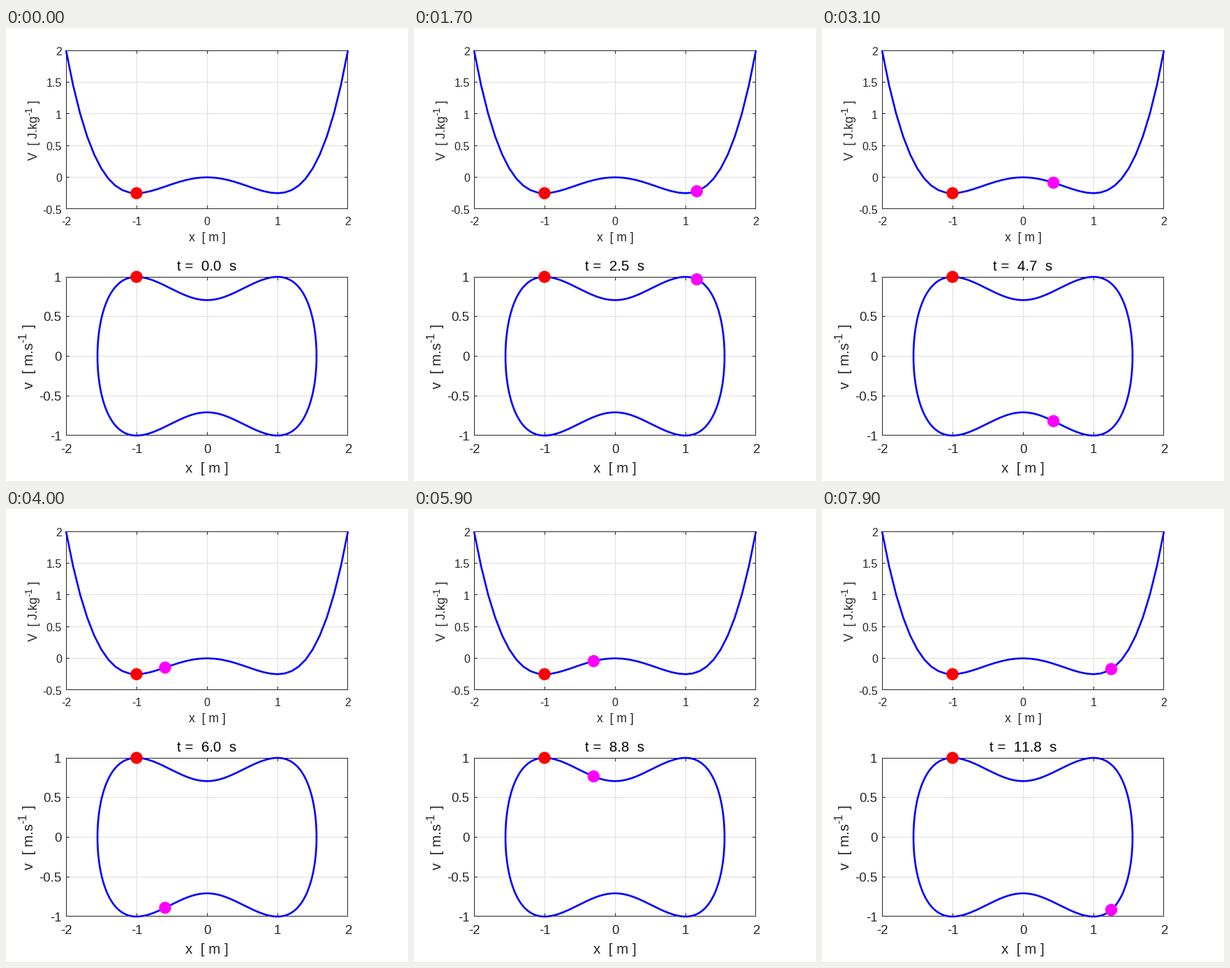
A matplotlib script for the animation above (8 s loop, 576x648 px).

```python
import math

import numpy as np
import matplotlib.pyplot as plt
from matplotlib.animation import FuncAnimation
from matplotlib.patches import Circle

W, H = 576, 648
FRAMES, INTERVAL, DT = 80, 100, 0.15
INK, GRID = "#262626", "#dedede"
LEFT, RIGHT = 86, 490
RADIUS = 8.67

plt.rcParams["font.family"] = "Liberation Sans"
plt.rcParams["text.kerning_factor"] = 6  # practically no kerning

# Advance widths in em, for aligning text by its pen positions
EM = {**dict.fromkeys(" .[]t", 0.278), **dict.fromkeys("xvskJ", 0.5),
      "-": 0.333, "=": 0.584, "m": 0.833, "V": 0.667}

# One unit is one pixel, with y pointing down
fig = plt.figure(figsize=(W / 72, H / 72), dpi=72, facecolor="white")
ax = fig.add_axes([0, 0, 1, 1])
ax.set(xlim=(0, W), ylim=(H, 0))
ax.axis("off")


def potential(x):
    return x**4 / 4 - x**2 / 2


def map_x(x):
    return LEFT + (x + 2) * (RIGHT - LEFT) / 4


def advance(s, size):
    return size * sum(EM.get(c, 0.556) for c in s)


def text(x, y, s, size, align=0.5, **kw):
    """Text whose advance box has the fraction `align` of its width left of x."""
    return ax.text(x - align * advance(s, size), y, s, fontsize=size,
                   **{"color": INK, "ha": "left", "va": "baseline", **kw})


def line(x0, y0, x1, y1, color):
    ax.plot([x0 + 0.5, x1 + 0.5], [y0 + 0.5, y1 + 0.5], color=color, lw=1,
            snap=False, solid_capstyle="projecting", zorder=1)


class Panel:
    def __init__(self, top, bottom, lo, hi):
        self.top, self.bottom, self.lo, self.hi = top, bottom, lo, hi

    def map_y(self, y):
        return self.bottom - (y - self.lo) / (self.hi - self.lo) * (self.bottom - self.top)

    def frame(self, size, label_x, drop, base):
        """Box, grid, ticks and tick labels on whole pixels."""
        x_end, y_end = RIGHT - 1, self.bottom - 1
        xs = [(x, min(math.floor(map_x(x)), x_end)) for x in range(-2, 3)]
        ys = [(y, min(math.floor(self.map_y(y) + 1e-6), y_end))
              for y in np.arange(self.lo, self.hi + 0.1, 0.5)]
        for _, px in xs:
            line(px, self.top, px, y_end, GRID)
        for _, py in ys:
            line(LEFT, py, x_end, py, GRID)
        for x, px in xs:
            line(px, self.top, px, self.top + 4, INK)
            line(px, y_end - 4, px, y_end, INK)
            text(map_x(x), base, f"{x}", size)
        for y, py in ys:
            line(LEFT, py, LEFT + 4, py, INK)
            line(x_end - 4, py, x_end, py, INK)
            text(label_x, self.map_y(y) + drop, f"{y:g}", size, align=1)
        for y in (self.top, y_end):
            line(LEFT, y, x_end, y, INK)
        for x in (LEFT, x_end):
            line(x, self.top, x, y_end, INK)

    def curve(self, x, y):
        ax.plot(map_x(x), self.map_y(y), color="#0000ff", lw=2.67, zorder=2,
                solid_capstyle="butt", solid_joinstyle="round")

    def dot(self, x, y, color, z):
        return ax.add_patch(Circle((map_x(x), self.map_y(y)), RADIUS,
                                   fc=color, ec="none", zorder=z))


def side_label(x, mid, body, size, rise):
    """Vertical label with a raised -1 before the closing bracket."""
    parts = [(body, size, 0), ("-1", 0.8 * size, rise), (" ]", size, 0)]
    y = mid + sum(advance(s, z) for s, z, _ in parts) / 2
    for s, z, up in parts:
        indent = advance(s, z) - advance(s.lstrip(), z)
        text(x - up, y - indent, s.lstrip(), z, align=0,
             rotation=90, rotation_mode="anchor")
        y -= advance(s, z)


def motion(steps=50):
    """Runge-Kutta path of x'' = x - x^3, sampled once per frame."""
    def f(s):
        return np.array([s[1], s[0] - s[0]**3])

    s, h, path = np.array([-1.0, 1.0]), DT / steps, []
    for _ in range(FRAMES):
        path.append(s)
        for _ in range(steps):
            a = f(s)
            b = f(s + h / 2 * a)
            c = f(s + h / 2 * b)
            d = f(s + h * c)
            s = s + h / 6 * (a + 2 * b + 2 * c + d)
    return path


well = Panel(32, 259, -0.5, 2)
phase = Panel(356, 583, -1, 1)

well.frame(16, 80, 6.9, 282)
phase.frame(18.67, 79.4, 6.7, 608)
text(288, 305, "x  [ m ]", 17.6)
text(288, 636, "x  [ m ]", 20.53)
side_label(45, 145.6, "V  [ J.kg", 17.6, 8)
side_label(39, 469.6, "v  [ m.s", 20.53, 10)

# Closed orbit of energy 1/4
x_orbit = np.sqrt(1 + np.sqrt(2)) * np.cos(np.linspace(0, 2 * np.pi, 401))
v_orbit = np.sqrt(np.maximum(0.5 + x_orbit**2 - x_orbit**4 / 2, 0))
v_orbit[201:] *= -1
phase.curve(x_orbit, v_orbit)

grid_x = np.linspace(-2, 2, 41)
well.curve(grid_x, potential(grid_x))

well.dot(-1, potential(-1), "#ff0000", 3)
phase.dot(-1, 1, "#ff0000", 3)
well_dot = well.dot(-1, potential(-1), "#ff00ff", 4)
phase_dot = phase.dot(-1, 1, "#ff00ff", 4)
title = text(288, 347, "", 20.53, color="black")
path = motion()


def update(n):
    x, v = path[n]
    well_dot.center = map_x(x), well.map_y(potential(x))
    phase_dot.center = map_x(x), phase.map_y(v)
    for dot in (well_dot, phase_dot):
        dot.set_visible(n > 0)
    label = f"t =  {n * 15 / 100:.1f}  s"
    title.set_text(label)
    title.set_x(288 - advance(label, 20.53) / 2)
    return well_dot, phase_dot, title


anim = FuncAnimation(fig, update, frames=FRAMES, interval=INTERVAL,
                     repeat=True, repeat_delay=0)
plt.show()
```
